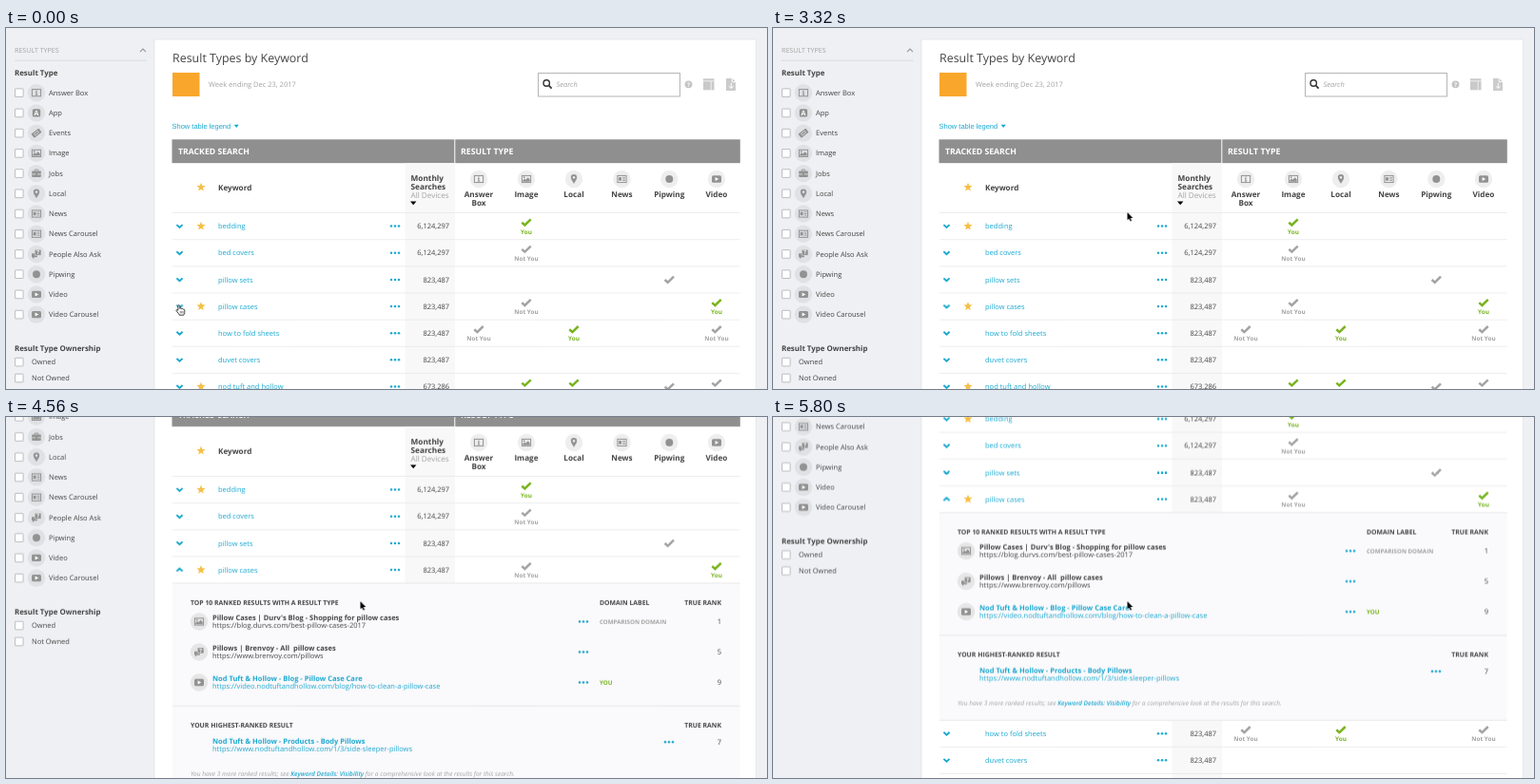
These frames come from a looping animation (800x380 px, 5820 ms). An HTML page:

```html
<!DOCTYPE html>
<html lang="en">
<head>
<meta charset="utf-8">
<title>Result Types by Keyword</title>
<style>
html, body { margin: 0; width: 100%; height: 100%; overflow: hidden; background: #eef0f3; }
svg { display: block; width: 800px; height: 380px; }
text { font: 7.5px "Open Sans", sans-serif; fill: #444; text-rendering: geometricPrecision; }
.b { font-weight: 700; }
.i { font-style: italic; }
.mid { text-anchor: middle; }
.end { text-anchor: end; }
.arial { font-family: "Liberation Sans", Arial, sans-serif; }
.blue { fill: #1ba8d0; }
.grey { fill: #a3a3a3; }
.green { fill: #78b41e; }
.white { fill: #fff; }
.ico { fill: #929292; }

#page, #pointer, .open, .tail, .flip, .hand, .arrow { animation: 5820ms infinite; }
#page { animation-name: scroll; }
#pointer { animation-name: point; }
.open, .tail, .flip, .hand, .arrow { animation-timing-function: step-end; }
.open { animation-name: open; }
.tail { animation-name: push; }
.flip { animation-name: flip; }
.hand { animation-name: hand; }
.arrow { animation-name: arrow; }

@keyframes scroll {
  0%, 63.57% { transform: translateY(0); animation-timing-function: cubic-bezier(.4, 0, .75, .62); }
  72.51% { transform: translateY(-68px); animation-timing-function: cubic-bezier(.33, .36, .67, .755); }
  78.35% { transform: translateY(-132px); animation-timing-function: cubic-bezier(.33, .46, .67, .74); }
  84.19% { transform: translateY(-166px); animation-timing-function: cubic-bezier(.33, .33, .6, 1); }
  92.8%, 100% { transform: translateY(-206.5px); }
}
@keyframes point {
  0%, 12% { transform: translate(182px, 292px); animation-timing-function: ease-in-out; }
  30%, 38% { transform: translate(347px, 290px); animation-timing-function: ease-in-out; }
  52%, 100% { transform: translate(372.5px, 194px); }
}
@keyframes open { 0% { opacity: 0; } 59.7%, 100% { opacity: 1; } }
@keyframes push { 0% { transform: none; } 59.7%, 100% { transform: translateY(218.5px); } }
@keyframes flip { 0% { transform: none; } 59.7%, 100% { transform: scaleY(-1); } }
@keyframes hand { 0% { opacity: 1; } 51%, 100% { opacity: 0; } }
@keyframes arrow { 0% { opacity: 0; } 51%, 100% { opacity: 1; } }
</style>
</head>
<body>
<svg id="stage" viewBox="0 0 800 380"></svg>
<script>
(() => {
const text = (x, y, s, cls = '', size = 7.5) =>
  `<text x="${x}" y="${y}" class="${cls}" style="font-size:${size}px">${s}</text>`;
const rect = (x, y, w, h, fill, extra = '') =>
  `<rect x="${x}" y="${y}" width="${w}" height="${h}" fill="${fill}" ${extra}/>`;
const at = (x, y, s) => `<g transform="translate(${x} ${y})">${s}</g>`;
const line = (x1, x2, y, color = '#e9e9e9') =>
  `<path d="M${x1} ${y}H${x2}" stroke="${color}" stroke-width=".8"/>`;
const stroke = (d, color, w, cls = '') =>
  `<path d="${d}" class="${cls}" fill="none" stroke="${color}" stroke-width="${w}"/>`;

const GREY = '#929292';
const outline = rect(-4.6, -3.6, 9.2, 7.2, 'none', `stroke="${GREY}" stroke-width="1"`);
const icons = {
  answer: outline + stroke('M0 -.9V2.2M-1.1 2H1.1M-1 -.6H.2', GREY, 1) + rect(-.6, -2.5, 1.2, 1.1, GREY),
  app: rect(-4.2, -4.2, 8.4, 8.4, GREY, 'rx="1.5"') + text(0, 2.5, 'A', 'b mid white', 7),
  events: `<g transform="rotate(-38)">${rect(-5, -2.6, 10, 5.2, GREY, 'rx=".6"')}` +
    stroke('M-2.4 -1.1H2.4V1.1H-2.4Z', '#e4e4e4', .7) + '</g>',
  image: outline + `<path d="M-3.7 2.7V1.2L-1.9 -.6L-.6 .7L1.7 -1.7L3.7 .5V2.7Z" class="ico"/>` +
    '<circle cx="-2.3" cy="-1.8" r=".9" class="ico"/>',
  jobs: rect(-4.8, -2.6, 9.6, 6.4, GREY, 'rx=".8"') + stroke('M-1.7 -2.6V-4H1.7V-2.6', GREY, .9) +
    stroke('M-4.8 .8H-1M1 .8H4.8', '#e4e4e4', .8),
  local: '<path fill-rule="evenodd" class="ico" d="M0 5C-1 2.6 -3.2 .8 -3.2 -1.7A3.2 3.2 0 0 1 3.2 -1.7' +
    'C3.2 .8 1 2.6 0 5ZM0 -3A1.3 1.3 0 1 0 .01 -3Z"/>',
  news: outline + rect(-3.4, -1.9, 3, 3.6, GREY) + stroke('M.6 -1.6H3.5M.6 0H3.5M.6 1.6H3.5', GREY, .8),
  people: rect(-5, -.8, 6, 4, GREY, 'rx=".6"') + '<path d="M-4 3V5L-1.8 3Z" class="ico"/>' +
    rect(-1.8, -4.6, 6.8, 6, GREY, 'rx=".7" stroke="#e4e4e4" stroke-width=".6"') +
    text(1.6, .5, '?', 'b mid white', 5.6),
  dot: '<circle r="4" class="ico"/>',
  video: rect(-5, -3.7, 10, 7.4, GREY, 'rx="1.5"') + '<path d="M-1.4 -2L2.2 0L-1.4 2Z" fill="#fff"/>',
};
const badge = (name, x, y, bg = '#eeeeee') => at(x, y, `<circle r="9.2" fill="${bg}"/>` + icons[name]);
const checkbox = (x, y) =>
  rect(x, y - 4.3, 8.6, 8.6, '#fff', 'stroke="#adb0b3" stroke-width=".8" rx=".5"');
const dots = (x, y) => [-4, 0, 4].map(d => `<circle cx="${x + d}" cy="${y}" r="1.25" class="blue"/>`).join('');
const chevron = cls => stroke('M-3.1 -1.5L0 1.4L3.1 -1.5', '#1ba8d0', 1.9, cls);

const star = (x, y) => {
  const pts = Array.from({ length: 10 }, (_, k) => {
    const r = k % 2 ? 2.1 : 4.8, a = k * Math.PI / 5;
    return (r * Math.sin(a)).toFixed(2) + ',' + (-r * Math.cos(a)).toFixed(2);
  });
  return at(x, y, `<polygon points="${pts.join(' ')}" fill="#f6bf45"/>`);
};

const tick = (x, y, color) => at(x, y, stroke('M-4.7 .1L-1.6 2.9L4.7 -3.2', color, 2.5));
const cols = [497, 547, 597, 647.5, 697.3, 747];

// mark: column index and kind, y = yours, n = not yours, o = plain
function mark([col, kind], y) {
  const x = cols[col], mine = kind === 'y';
  if (kind === 'o') return tick(x, y, '#a3a3a3');
  return tick(x, y - 4, mine ? '#78b41e' : '#a3a3a3') +
    text(x, y + 8.1, mine ? 'You' : 'Not You', 'b mid ' + (mine ? 'green' : 'grey'), 6.4);
}

const rows = [
  ['bedding', '6,124,297', '1y', true],
  ['bed covers', '6,124,297', '1n'],
  ['pillow sets', '823,487', '4o'],
  ['pillow cases', '823,487', '1n 5y', true],
  ['how to fold sheets', '823,487', '0n 2y 5n'],
  ['duvet covers', '823,487', ''],
  ['nod tuft and hollow', '673,286', '1y 2y 4o 5n', true],
];

function row([word, count, marks, starred], i) {
  const y = 208.6 + 28.15 * i;
  return at(182.5, y, chevron(i === 3 ? 'flip' : '')) +
    (starred ? star(205, y) : '') +
    text(223, y + 2.7, word, 'blue') + dots(409, y) +
    text(466, y + 2.7, count, 'end') +
    marks.split(' ').filter(Boolean).map(m => mark(m, y)).join('') +
    line(175, 771.5, y + 14.1);
}

function sidebar() {
  const items = [['answer', 'Answer Box'], ['app', 'App'], ['events', 'Events'], ['image', 'Image'],
    ['jobs', 'Jobs'], ['local', 'Local'], ['news', 'News'], ['news', 'News Carousel'],
    ['people', 'People Also Ask'], ['dot', 'Pipwing'], ['video', 'Video'], ['video', 'Video Carousel']];
  return text(9, 26, 'RESULT TYPES', 'grey', 7.1) + stroke('M141 25.2L144 22.2L147 25.2', '#999', 1.2) +
    line(9, 147.5, 34.3, '#d5d8da') + text(9, 50.2, 'Result Type', 'b', 7.9) +
    items.map(([icon, label], i) => {
      const y = 68.2 + 21.22 * i;
      return checkbox(9.5, y) + badge(icon, 32, y, '#dfe1e4') + text(45, y + 2.6, label);
    }).join('') +
    text(9, 340.3, 'Result Type Ownership', 'b', 7.9) +
    checkbox(9.5, 351.6) + text(27, 354.3, 'Owned') +
    checkbox(9.5, 368.5) + text(27, 371.2, 'Not Owned');
}

function header() {
  const heads = [['answer', 'Answer'], ['image', 'Image'], ['local', 'Local'],
    ['news', 'News'], ['dot', 'Pipwing'], ['video', 'Video']];
  return text(175, 36, 'Result Types by Keyword', '', 12.45) +
    rect(175, 47, 28.5, 25, '#f9a72c') +
    text(213, 61.7, 'Week ending Dec 23, 2017', 'grey') +
    rect(559.5, 47.5, 149, 24.5, '#fff', 'stroke="#b5b5b5" stroke-width="1"') +
    '<circle cx="568.2" cy="58" r="3.2" fill="none" stroke="#333" stroke-width="1.4"/>' +
    stroke('M570.6 60.5L573.6 63.7', '#333', 1.8) + text(578.5, 62, 'Search', 'i grey') +
    '<circle cx="717.5" cy="59.3" r="3.9" fill="#c4c4c4"/>' + text(717.5, 61.6, '?', 'b mid white', 6.4) +
    rect(733, 53.3, 11.5, 12, '#c9c9c9') + stroke('M733 55.8H744.5M741.2 56V65.3', '#fff', .7) +
    '<path d="M757 53H763.5L767 56.5V66H757Z" fill="#cbcbcb"/>' +
    stroke('M763.3 53V56.7H767M762.3 58V63.4M759.9 61.2L762.3 63.6L764.7 61.2', '#fff', 1) +
    text(174.5, 105.8, 'Show table legend', 'blue arial') +
    '<path d="M239.6 101.8H244.8L242.2 105Z" class="blue"/>' +
    rect(174.5, 117.3, 296.8, 24.9, '#8f8f8f') + rect(472.3, 117.3, 299.5, 24.9, '#8f8f8f') +
    text(181, 133, 'TRACKED SEARCH', 'b white', 8.7) + text(478, 133, 'RESULT TYPE', 'b white', 8.8) +
    rect(419.5, 142.2, 52.5, 700, '#f8f8f8') +
    star(205, 167.6) + text(223, 171, 'Keyword', 'b', 8.15) +
    text(425.5, 161, 'Monthly', 'b', 8.25) + text(425.5, 170, 'Searches', 'b', 8.25) +
    text(425.5, 178.8, 'All Devices', 'grey', 8.15) + '<path d="M425 182.4H431.4L428.2 186.2Z"/>' +
    heads.map(([icon, label], i) => badge(icon, cols[i], 159) +
      text(cols[i], 178.3, label, 'b mid', 8.2)).join('') +
    text(497, 187, 'Box', 'b mid', 8.2) + line(175, 771.5, 194.5);
}

const result = (y, title, url, cls = '') =>
  text(217, y - 1.7, title, 'b ' + cls) + text(217, y + 6.4, url, cls);
const rank = (x, y, n) => dots(x, y) + text(752, y + 2.7, n, 'end');

function details() {
  const caption = (x, y, s, cls = '') => text(x, y, s, 'b ' + cls, 6.88);
  const badges = ['image', 'people', 'video'], ranks = [1, 5, 9];
  return rect(175, 307.1, 596.5, 218.5, '#faf9fb') + line(175, 771.5, 307.1) +
    line(175, 771.5, 436.3, '#e6e4e8') + line(175, 771.5, 525.6) +
    caption(194, 329.6, 'TOP 10 RANKED RESULTS WITH A RESULT TYPE') +
    caption(624, 329.6, 'DOMAIN LABEL') + caption(752, 329.6, 'TRUE RANK', 'end') +
    badges.map((name, i) => {
      const y = 347.5 + 32 * i;
      return badge(name, 203, y, '#e6e6e6') + rank(607, y, ranks[i]);
    }).join('') +
    result(347.5, "Pillow Cases | Durv's Blog - Shopping for pillow cases",
      'https://blog.durvs.com/best-pillow-cases-2017') +
    text(624, 349.8, 'COMPARISON DOMAIN', 'b grey', 6.2) +
    result(379.5, 'Pillows | Brenvoy - All&nbsp; pillow cases', 'https://www.brenvoy.com/pillows') +
    result(411.5, 'Nod Tuft &amp; Hollow - Blog - Pillow Case Care',
      'https://video.nodtuftandhollow.com/blog/how-to-clean-a-pillow-case', 'blue') +
    text(624, 413.8, 'YOU', 'b green', 6.3) +
    caption(194, 459, 'YOUR HIGHEST-RANKED RESULT') + caption(752, 459, 'TRUE RANK', 'end') +
    result(478, 'Nod Tuft &amp; Hollow - Products - Body Pillows',
      'https://www.nodtuftandhollow.com/1/3/side-sleeper-pillows', 'blue') +
    rank(697, 474.2, 7) +
    text(194, 510.3, 'You have 3 more ranked results; see <tspan class="blue" font-weight="600">' +
      'Keyword Details: Visibility</tspan> for a comprehensive look at the results for this search.',
      'i grey', 6.6);
}

const pointer =
  '<g class="hand"><path d="M-1.1 .6C-1.1 -.6 .8 -.6 .8 .6V3.4C1.3 2.7 2.5 2.9 2.6 3.7C3.2 3.1 4.2 3.4 4.3 4.2' +
  'C5 3.8 5.8 4.2 5.8 5V7.4C5.8 8.6 5 9 4.8 10.2H.2C0 9 -1.5 7.6 -2.9 5.7C-3.5 4.7 -2.3 4 -1.1 5.3Z" ' +
  'fill="#fff" stroke="#111" stroke-width=".8"/>' + stroke('M1.2 6V8.4M2.7 6V8.4M4.1 6V8.4', '#111', .5) + '</g>' +
  '<path class="arrow" d="M0 0V8.3L1.9 6.6L3.1 9.5L4.5 8.9L3.3 6.1H5.8Z" ' +
  'stroke="#fff" stroke-width=".9" paint-order="stroke"/>';

document.getElementById('stage').innerHTML =
  `<g id="page">${sidebar()}` +
  rect(156, 12, 632.5, 900, '#fff', 'stroke="#e2e4e7" stroke-width=".8"') + header() +
  rows.slice(0, 4).map(row).join('') +
  `<g class="tail">${rows.slice(4).map((r, i) => row(r, i + 4)).join('')}</g>` +
  `<g class="open">${details()}</g></g>` +
  `<g id="pointer">${pointer}</g>`;
})();
</script>
</body>
</html>
```
